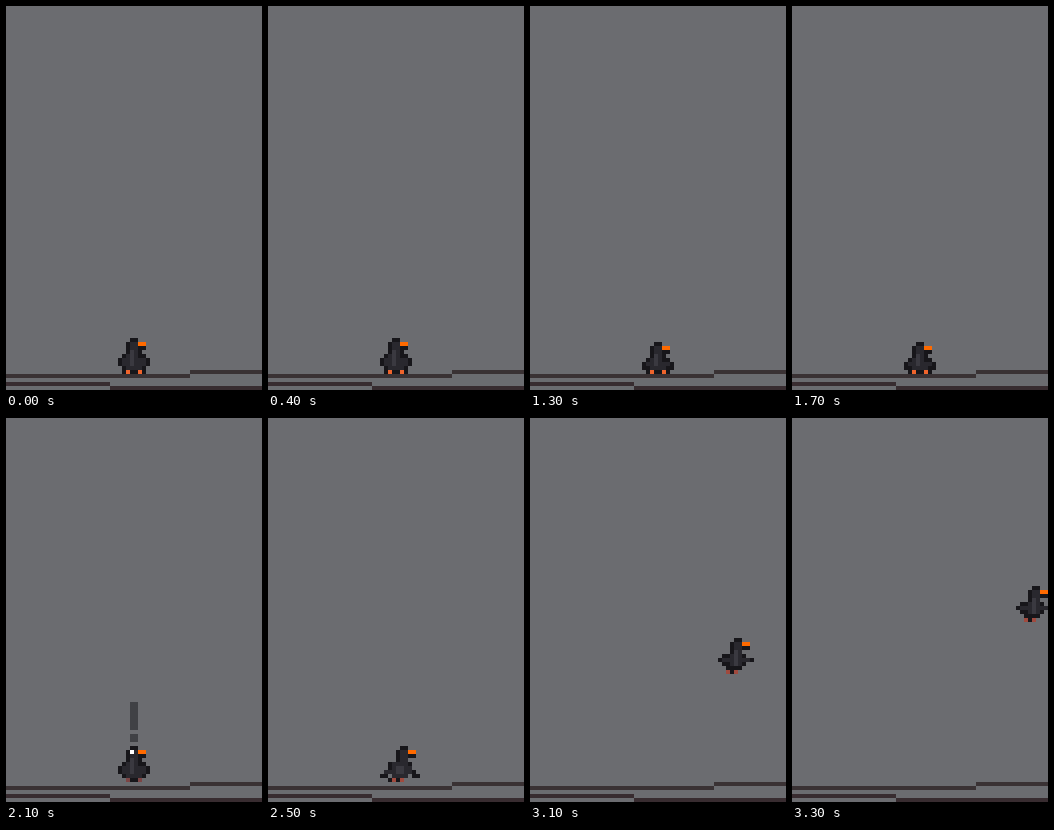
An HTML page with a canvas for the animation above (3.4 s loop, 256 px wide and 384 px high).

```html
<!DOCTYPE html>
<html lang="en">
<head>
<meta charset="utf-8">
<title>Bird takes off</title>
<style>
html, body { margin: 0; width: 100%; height: 100%; overflow: hidden; background: #6b6c70; }
canvas { display: block; }
</style>
</head>
<body>
<canvas id="stage" width="256" height="384"></canvas>
<script>
const ctx = document.getElementById('stage').getContext('2d');
const CELL = 4, STEP = 100, STEPS = 34;
const SKY = '#6b6c70', BLACK = '#17161a', DARK = '#29282e', GREY = '#3a3940';
const BEAK = '#ff6a00', FOOT = '#f0642c', TUCKED = '#a04a3e', WIRE = '#3a3234';

function box(color, x, y, w = 1, h = 1) {
  ctx.fillStyle = color;
  ctx.fillRect(x, y, w, h);
}

function drawHead() {
  box(BLACK, 0, 0, 2);
  box(BLACK, -1, 1, 1, 3);
  box(DARK, 0, 1, 2, 3);
  box(BEAK, 2, 1, 2);
  box(BLACK, 2, 2, 2);
}

// Origin is the top left of the head
function at(x, y, draw) {
  ctx.save();
  ctx.translate(x, y);
  draw();
  ctx.restore();
}

function perched(crouch, lift, startled) {
  at(31, 83 + crouch - lift, () => {
    const low = 8 - crouch;
    drawHead();
    box(BLACK, 2, 3);
    box(BLACK, -2, 4, 6, low - 4);
    box(BLACK, -3, 5, 8, 2);
    box(DARK, -2, 5, 1, low - 6);
    box(DARK, 3, 5, 1, low - 6);
    box(DARK, -1, 4, 4, low - 4);
    box(GREY, 0, 3, 1, low - 4);
    box(BLACK, 2, 4);
    if (startled) box('#fff', 0, 1);
    box(BLACK, -2, low, 6);
    if (lift) box(SKY, -2, low), box(SKY, 3, low);
    const foot = lift ? '#7c4444' : FOOT;
    box(foot, -1, low);
    box(foot, 2, low);
  });
}

const wings = {
  down() {
    box(BLACK, -3, 4, 6, 3);
    box(BLACK, -4, 6, 8);
    box(BLACK, -5, 7, 2);
    box(BLACK, 3, 7, 2);
    box(DARK, -4, 6, 2);
    box(DARK, 2, 5, 1, 2);
    box(DARK, -2, 4, 4, 4);
    box(GREY, -1, 5, 2, 2);
    box(TUCKED, -2, 8);
    box(TUCKED, 0, 8);
    box(BLACK, -3, 8);
    box(BLACK, -1, 8);
  },
  level() {
    box(BLACK, -3, 4, 6, 3);
    box(BLACK, -4, 5, 9, 1);
    box(BLACK, -2, 7, 4);
    box(DARK, -3, 5, 7);
    box(DARK, -1, 4, 3, 3);
    box(GREY, 0, 3, 1, 4);
    box(TUCKED, -2, 8);
    box(TUCKED, 0, 8);
    box(BLACK, -1, 8);
  },
  up() {
    box(BLACK, -4, 2, 2, 6);
    box(BLACK, 3, 2, 2, 4);
    box(BLACK, -2, 4, 5, 3);
    box(BLACK, -3, 7, 3);
    box(DARK, -3, 4, 6, 2);
    box(DARK, 3, 3, 1, 2);
    box(GREY, -1, 4, 2, 2);
    box(GREY, -2, 6);
    box(TUCKED, -3, 8);
    box(TUCKED, -1, 8);
    box(BLACK, -4, 8);
  }
};

function flying(i) {
  const path = [[33, 82], [35, 79], [38, 75], [41, 70], [44, 66], [47, 61], [51, 55], [55, 49], [60, 42]];
  const flap = ['down', 'level', 'up', 'up', 'level', 'down', 'level', 'up', 'level'];
  at(...path[i], () => {
    drawHead();
    wings[flap[i]]();
  });
}

function alarm(alpha) {
  ctx.globalAlpha = alpha;
  box(BLACK, 31, 71, 2, 7);
  box(BLACK, 31, 79, 2, 2);
  ctx.globalAlpha = 1;
}

function drawScene(n) {
  ctx.setTransform(CELL, 0, 0, CELL, 0, 0);
  box(SKY, 0, 0, 64, 96);
  box(WIRE, 0, 92, 46);
  box(WIRE, 46, 91, 18);
  box('#382c30', 0, 94, 26);
  box('#382c30', 26, 95, 38);

  if (n < 19) perched(n % 2, 0, false);
  else if (n < 25) {
    const fade = [1, 0.75, 0.5, 0.25, 0.1, 0][n - 19];
    perched(n > 22 ? 1 : 0, n === 20 || n === 21 ? 1 : 0, n < 24);
    alarm(fade);
  } else flying(n - 25);
}

function tick() {
  drawScene(Math.floor(performance.now() / STEP) % STEPS);
  requestAnimationFrame(tick);
}
tick();
</script>
</body>
</html>
```
